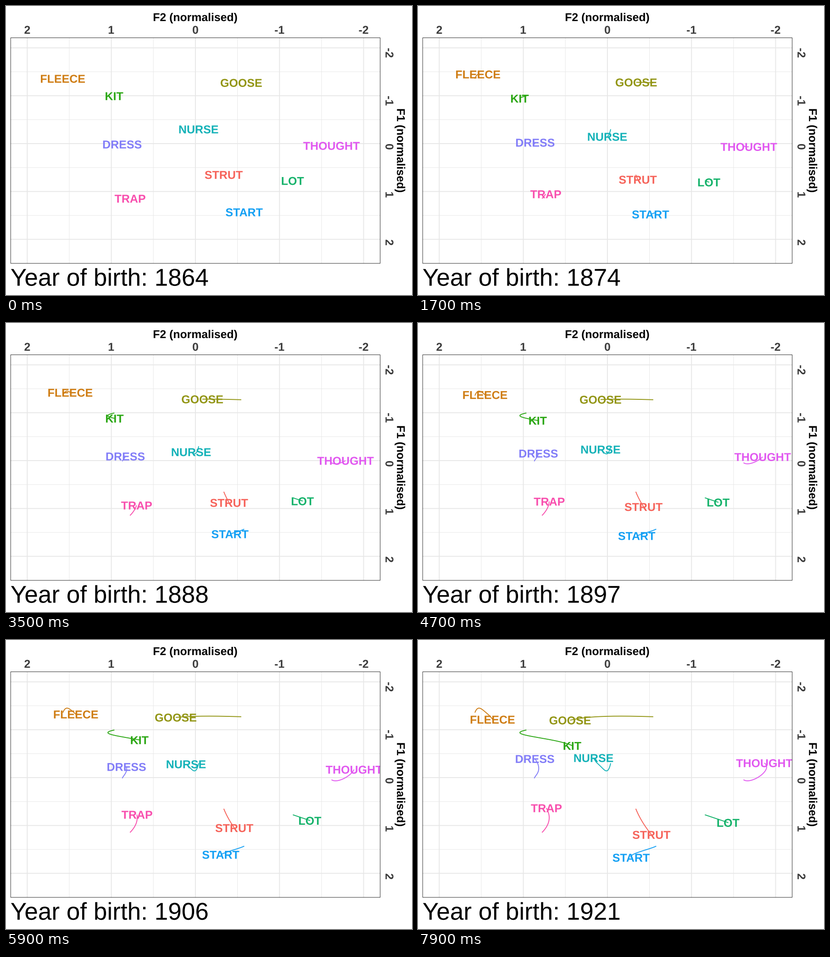
A matplotlib script for the animation above (8 s loop, 885 by 632 pixels).

```python
import numpy as np
import matplotlib.pyplot as plt
from matplotlib.animation import FuncAnimation
from matplotlib.patches import PathPatch, Rectangle
from matplotlib.textpath import TextPath
from matplotlib.transforms import Affine2D

W, H, DPI = 885, 632, 100
PT = 1.77                       # pixels per point of the plot
LINE = 1.07 * PT
LEFT, RIGHT, TOP, BOTTOM = 5.5 * PT, 816.1, 69, 563.3
ORIGIN, UNIT = (412.9, 300.9), (183.3, 104.7)
STEPS, FINE = 38, 6
GREY, GRID = "#3b3b3b", "#e7e7e7"

# Key points passed at equal spaces of time, in order of hue
PATHS = {
    "STRUT": [(474.7, 369.5), (489, 398), (509, 426.3)],
    "FLEECE": [(124, 159.3), (133.6, 149.5), (143.3, 155), (153, 163.4),
               (162.7, 174.3)],
    "GOOSE": [(512.8, 168.3), (445.5, 167), (382, 168.8), (331.5, 176)],
    "KIT": [(236.3, 197.3), (223, 204.5), (248.3, 211.4), (294, 219.7),
            (336.6, 231.7)],
    "LOT": [(625.3, 382.7), (676.5, 400)],
    "NURSE": [(420, 270), (410.3, 286.7), (401, 279.7), (392.3, 271.5),
              (382.9, 258.3)],
    "START": [(519.3, 451.3), (495.3, 459.8), (471.6, 468.1), (464.7, 476.3)],
    "DRESS": [(253.5, 303), (258.6, 294.9), (263.2, 281.5), (255, 260.3)],
    "THOUGHT": [(709.5, 306), (733, 305), (756, 288), (755, 269.5)],
    "TRAP": [(270.3, 421.5), (285.5, 395), (279.7, 368)],
}


def hue_color(deg, light=65, chroma=100):
    """Polar LUV colour, encoded for a display gamma of 1.8."""
    a = np.radians(deg)
    u = chroma * np.cos(a) / (13 * light) + 0.1978
    v = chroma * np.sin(a) / (13 * light) + 0.4683
    y = ((light + 16) / 116) ** 3
    xyz = y * np.array([9 * u, 4 * v, 12 - 3 * u - 20 * v]) / (4 * v)
    to_rgb = np.array([[3.2405, -1.5371, -0.4985],
                       [-0.9693, 1.8760, 0.0416],
                       [0.0556, -0.2040, 1.0572]])
    return np.clip(to_rgb @ xyz, 0.01, 0.95) ** (1 / 1.8)


def curve(points):
    """Polynomial through evenly timed key points, as columns x and y."""
    n = len(points)
    fit = np.polyfit(np.linspace(0, 1, n), np.array(points), n - 1)
    t = np.linspace(0, 1, STEPS * FINE + 1)
    return np.vander(t, n) @ fit


def glyphs(text, size=14 * PT, weight="bold"):
    return TextPath((0, 0), text, size=size,
                    prop={"family": "Liberation Sans", "weight": weight})


def place(path, x, y, turn=0, centred=True):
    """Put the baseline at (x, y), turned clockwise."""
    box = path.get_extents()
    shift = -(box.x0 + box.x1) / 2 if centred else 0
    move = Affine2D().translate(shift, 0).scale(1, -1)
    return move.rotate_deg(turn).translate(x, y).transform_path(path)


def add_shape(path, color="black", z=4):
    return ax.add_patch(PathPatch(path, fc=color, lw=0, zorder=z))


def add_line(x, y, color, width, z):
    return ax.plot(x, y, color=color, lw=width * 72 / DPI, snap=False,
                   zorder=z, solid_capstyle="butt",
                   solid_joinstyle="round")[0]


fig = plt.figure(figsize=(W / DPI, H / DPI), dpi=DPI, facecolor="white")
ax = fig.add_axes([0, 0, 1, 1])
ax.set_xlim(0, W)
ax.set_ylim(H, 0)
ax.axis("off")

# Grid, tick labels and titles
for n in np.arange(-2, 2.5, 0.5):
    x, y = ORIGIN[0] - n * UNIT[0], ORIGIN[1] + n * UNIT[1]
    major = n == int(n)
    width = LINE if major else LINE / 2
    add_line([x, x], [TOP, BOTTOM], GRID, width, 1)
    add_line([LEFT, RIGHT], [y, y], GRID, width, 1)
    if major:
        tick = glyphs(f"{n:.0f}")
        add_shape(place(tick, x, 60.7), GREY)
        add_shape(place(tick, 827.3, y, 90, centred=False), GREY)
add_shape(place(glyphs("F2 (normalised)"), 412.7, 33))
add_shape(place(glyphs("F1 (normalised)"), 852.3, 316.3, 90))

# Only the inner half of the border shows
inset = LINE / 4
panel = Rectangle((LEFT, TOP), RIGHT - LEFT, BOTTOM - TOP,
                  transform=ax.transData)
ax.add_patch(Rectangle((LEFT + inset, TOP + inset),
                       RIGHT - LEFT - 2 * inset, BOTTOM - TOP - 2 * inset,
                       fc="none", ec="#242424", lw=LINE / 2 * 72 / DPI,
                       snap=False, zorder=5))

# Moving parts
CAP = glyphs("H").get_extents().height
movers = []
for i, (name, points) in enumerate(PATHS.items()):
    color = hue_color(15 + 360 * i / len(PATHS))
    word = glyphs(name, 25)
    trail = add_line([], [], color, LINE, 2)
    label = add_shape(word, color, 3)
    for part in (trail, label):
        part.set_clip_path(panel)
    movers.append((curve(points), trail, label, word))
year = add_shape(glyphs("1"))


def draw(tick):
    step = max(0, (tick - 3) // 2)
    end = step * FINE
    for path, trail, label, word in movers:
        x, y = path[end]
        trail.set_data(path[:end + 1, 0], path[:end + 1, 1] - 0.5)
        label.set_path(place(word, x, y + CAP / 2))
    text = glyphs(f"Year of birth: {1864 + step * 3 // 2}", 30 * PT, "normal")
    year.set_path(place(text, LEFT, 611.7, centred=False))
    return [year]


anim = FuncAnimation(fig, draw, frames=80, interval=100, repeat=True,
                     repeat_delay=0, init_func=lambda: draw(0))
plt.show()
```
